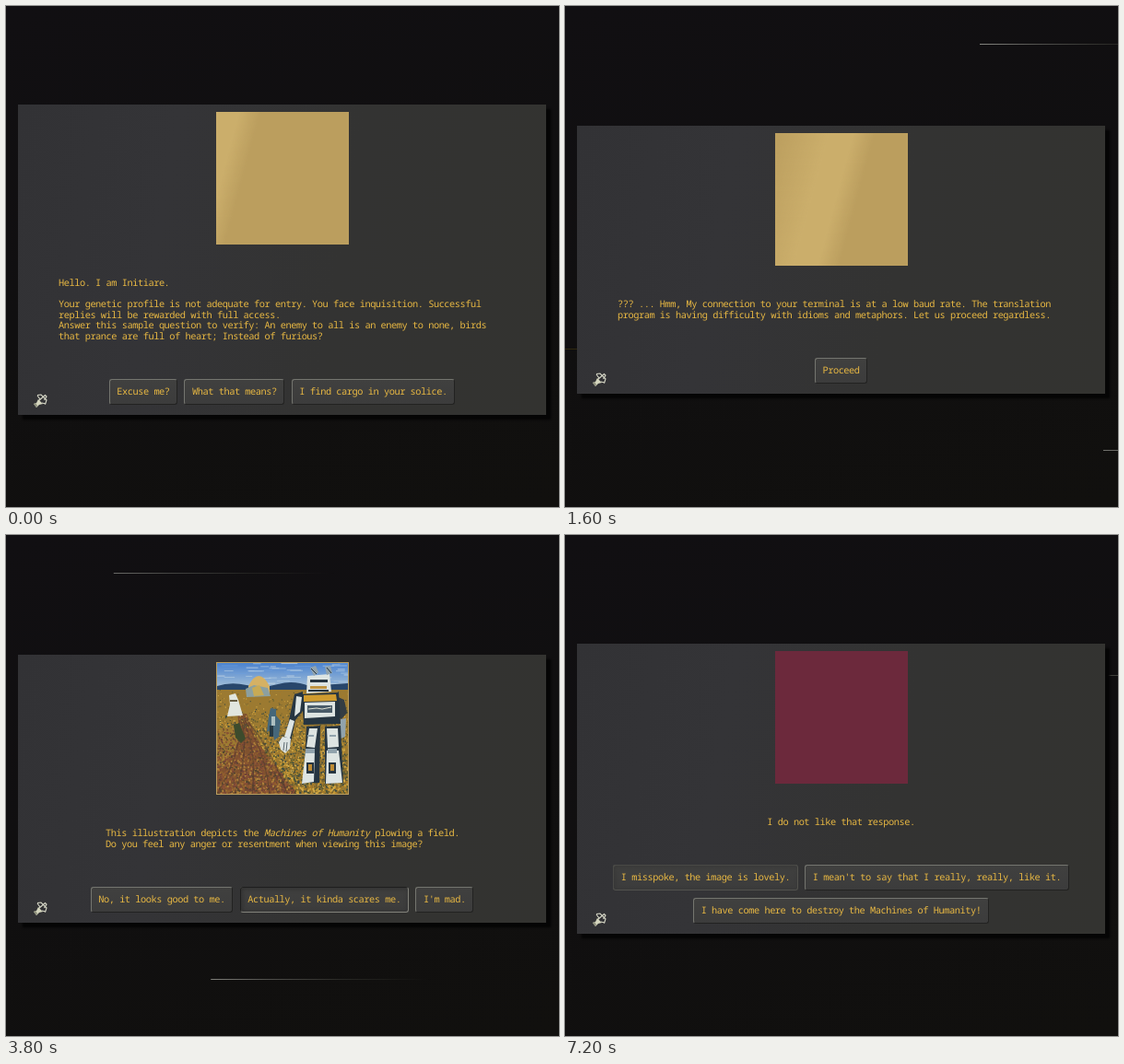
An HTML page with a canvas that plays this animation: 600x544 px, repeating every 8 s.

```html
<!DOCTYPE html>
<html lang="en">
<head>
<meta charset="utf-8">
<title>Terminal dialogue</title>
<style>
:root { --loop: 8s linear infinite; --cut: 8s step-end infinite; }
* { box-sizing: border-box; }
html, body { margin: 0; width: 100%; height: 100%; overflow: hidden; }
body {
  position: relative;
  background: linear-gradient(165deg, #110f12, #100f10 50%, #11100e);
  color: #e8b843;
  font: 10.3px/11.47px "Noto Sans Mono", "DejaVu Sans Mono", monospace;
  letter-spacing: -.447px;
  text-rendering: geometricPrecision;
  white-space: pre;
}

/* Background streaks */
.streak { position: absolute; left: 0; height: 1px; }
.comet { width: 240px; background: linear-gradient(90deg, #9c9c96, #62625e 25%, #2f2f2b 60%, transparent); }
.top { top: 41px; animation: top var(--loop); }
.low { top: 482px; animation: low var(--loop); }
.edge { width: 14px; background: #30290f; }
.right { left: 589px; width: 11px; background: #41413c; }
.e1 { top: 262px; animation: e1 var(--loop); }
.e2 { top: 372px; animation: e2 var(--loop); }
.e3 { top: 262px; animation: e3 var(--loop); }
.e4 { top: 372px; animation: e4 var(--loop); }
.e5 { top: 152px; animation: e5 var(--loop); }
@keyframes top {
  0%, 4.5% { transform: translateX(600px); opacity: .6; }
  10% { transform: translateX(499px); opacity: .7; }
  20% { transform: translateX(450px); opacity: .85; }
  40% { transform: translateX(190px); opacity: .85; }
  43.75% { transform: translateX(145px); }
  53.75% { transform: translateX(70px); opacity: .5; }
  58.75% { transform: translateX(0); opacity: .25; }
  64%, 100% { transform: translateX(0); opacity: 0; }
}
@keyframes low {
  0%, 18% { transform: translateX(600px); opacity: .7; }
  20% { transform: translateX(584px); }
  40% { transform: translateX(324px); opacity: .85; }
  58.75% { transform: translateX(70px); opacity: .75; }
  63.75% { transform: translateX(44px); }
  71.25% { transform: translateX(8px); opacity: .55; }
  76% { transform: translateX(0); opacity: .35; }
  84%, 100% { transform: translateX(0); opacity: 0; }
}
@keyframes e1 { 0% { opacity: 0; } 4%, 11% { opacity: 1; } 16%, 100% { opacity: 0; } }
@keyframes e2 { 0% { opacity: 0; } 4%, 20% { opacity: 1; } 28%, 100% { opacity: 0; } }
@keyframes e3 { 0%, 55% { opacity: 0; } 57%, 61% { opacity: 1; } 68%, 100% { opacity: 0; } }
@keyframes e4 { 0%, 55% { opacity: 0; } 57%, 70% { opacity: .9; } 78%, 100% { opacity: 0; } }
@keyframes e5 { 0%, 86% { opacity: 0; } 89%, 100% { opacity: 1; } }

/* Panels */
.panel {
  position: absolute; left: 13px; width: 573px; visibility: hidden;
  background: linear-gradient(100deg, #323235, #343437 28%, #333332 60%, #333330);
  box-shadow: 5px 5px 2px #050505;
}
.a { top: 107px; height: 337px; animation: a var(--cut); }
.b { top: 130px; height: 291px; animation: b var(--cut); }
.c { top: 130px; height: 291px; animation: c var(--cut); }
.d { top: 118px; height: 315px; animation: d var(--cut); }
@keyframes a { 0% { visibility: visible; } 12.5%, 100% { visibility: hidden; } }
@keyframes b { 0% { visibility: hidden; } 12.5% { visibility: visible; } 27.5%, 100% { visibility: hidden; } }
@keyframes c { 0% { visibility: hidden; } 27.5% { visibility: visible; } 60%, 100% { visibility: hidden; } }
@keyframes d { 0% { visibility: hidden; } 60%, 100% { visibility: visible; } }

.tile {
  position: absolute; left: 215px; top: 8px; width: 144px; height: 144px;
  overflow: hidden; background: #bb9e5e; --shine: #cbae6b;
}
.d .tile { background: #6c293c; --shine: #763648; }
.shine {
  position: absolute; left: 0; top: 0; width: 110px; height: 144px;
  background: linear-gradient(90deg, transparent, var(--shine) 55%, var(--shine) 78%, transparent);
}
.a .shine { animation: shineA var(--loop); }
.b .shine { animation: shineB var(--loop); }
.d .shine { animation: shineD var(--loop); }
@keyframes shineA {
  0% { transform: translateX(-81px) skewX(-15deg); }
  12.5%, 100% { transform: translateX(-9px) skewX(-15deg); }
}
@keyframes shineB {
  0%, 12.5% { transform: translateX(-77px) skewX(-15deg); }
  27.5%, 100% { transform: translateX(35px) skewX(-15deg); }
}
@keyframes shineD {
  0%, 60% { transform: translateX(-77px) skewX(-15deg); }
  71.25% { transform: translateX(7px) skewX(-15deg); }
  90%, 100% { transform: translateX(180px) skewX(-15deg); }
}
canvas { position: absolute; left: 1px; top: 1px; animation: reveal var(--loop); }
@keyframes reveal { 0%, 27.5% { opacity: 0; } 32.5%, 100% { opacity: 1; } }

.say { position: absolute; top: 189.3px; left: 44px; }
.c .say { left: 95px; }
.d .say { left: 0; width: 100%; text-align: center; }
.row {
  position: absolute; left: 0; bottom: 11.5px; width: 100%;
  display: flex; justify-content: center; gap: 7.3px;
}
.row.upper { bottom: 47px; }
.btn {
  position: relative; height: 28px; padding: 0 7.6px; line-height: 26px;
  border: 1px solid; border-color: #74756f #222221 #222221 #74756f; border-radius: 3px;
  background: linear-gradient(#40403f, #3c3c3c);
}
.btn::after {
  content: ""; position: absolute; inset: -1px; opacity: 0; border-radius: 3px;
  border: 1px solid; border-color: #1e1e1e #82827b #82827b #1e1e1e;
  box-shadow: inset 1px 1px 5px #2228;
}
.p1::after { animation: p1 var(--loop); }
.p2::after { animation: p2 var(--loop); }
.p3::after { animation: p3 var(--loop); }
.p4::after { animation: p4 var(--loop); }
@keyframes p1 { 0%, 8% { opacity: 0; } 9.5%, 100% { opacity: 1; } }
@keyframes p2 { 0%, 24% { opacity: 0; } 25.5%, 100% { opacity: 1; } }
@keyframes p3 { 0%, 39% { opacity: 0; } 42%, 100% { opacity: 1; } }
@keyframes p4 { 0%, 89% { opacity: 0; } 90%, 100% { opacity: .5; } }
.sound { position: absolute; left: 16px; bottom: 7px; width: 17px; height: 17px; }
</style>
</head>
<body><div class="streak comet top"></div><div class="streak comet low"></div><div class="streak edge e1"></div><div class="streak edge e2"></div><div class="streak right e3"></div><div class="streak right e4"></div><div class="streak right e5"></div><svg width="0" height="0" style="position:absolute"><symbol id="sound" viewBox="0 0 17 17"><g fill="none" stroke="#d9dac9" stroke-width="1.1"><path d="M5 2.5 9 2l6 6-1.5 4.5"/><path d="M6 9 13.5 2.5 15 4l-2.5 4"/><path d="m5 3 3 4m2 4 4 1"/></g><path d="m1 12 3-1 2-4 5 5-4 1-3 3z" fill="#d4d5bd"/><path d="m1 12 3 4 1-2-2-3z" fill="#8d8f7c"/></symbol></svg><section class="panel a"><div class="tile"><div class="shine"></div></div><div class="say">Hello. I am Initiare.

Your genetic profile is not adequate for entry. You face inquisition. Successful
replies will be rewarded with full access.
Answer this sample question to verify: An enemy to all is an enemy to none, birds
that prance are full of heart; Instead of furious?</div><div class="row"><span class="btn">Excuse me?</span><span class="btn">What that means?</span><span class="btn p1">I find cargo in your solice.</span></div><svg class="sound"><use href="#sound"/></svg></section><section class="panel b"><div class="tile"><div class="shine"></div></div><div class="say">??? ... Hmm, My connection to your terminal is at a low baud rate. The translation
program is having difficulty with idioms and metaphors. Let us proceed regardless.</div><div class="row"><span class="btn p2">Proceed</span></div><svg class="sound"><use href="#sound"/></svg></section><section class="panel c"><div class="tile"><canvas id="field" width="142" height="142"></canvas></div><div class="say">This illustration depicts the <i>Machines of Humanity</i> plowing a field.
Do you feel any anger or resentment when viewing this image?</div><div class="row"><span class="btn">No, it looks good to me.</span><span class="btn p3">Actually, it kinda scares me.</span><span class="btn">I'm mad.</span></div><svg class="sound"><use href="#sound"/></svg></section><section class="panel d"><div class="tile"><div class="shine"></div></div><div class="say">I do not like that response.</div><div class="row upper"><span class="btn p4">I misspoke, the image is lovely.</span><span class="btn">I mean't to say that I really, really, like it.</span></div><div class="row"><span class="btn">I have come here to destroy the Machines of Humanity!</span></div><svg class="sound"><use href="#sound"/></svg></section>
<script>
const g = document.getElementById('field').getContext('2d');
let seed = 7;
const rnd = () => (seed = (seed * 16807) % 2147483647) / 2147483647;
const pick = list => list[Math.floor(rnd() * list.length)];

function rect(color, x, y, w, h) {
  g.fillStyle = color;
  g.fillRect(x, y, w, h);
}
function shape(color, path) {
  g.fillStyle = color;
  g.fill(new Path2D(path));
}
function stroke(color, width, path) {
  g.strokeStyle = color;
  g.lineWidth = width;
  g.stroke(new Path2D(path));
}

function sky() {
  const fade = g.createLinearGradient(0, 0, 0, 28);
  fade.addColorStop(0, '#4a82cf');
  fade.addColorStop(1, '#a9c3d8');
  rect(fade, 0, 0, 142, 30);
  for (let i = 0; i < 45; i++) {
    rect(pick(['#dbe5ea99', '#6d9fdd99', '#b9d0e399']), rnd() * 142, rnd() * 22, 5 + rnd() * 14, 1);
  }
  shape('#28466b', 'M0 25Q15 20 32 24T66 23T100 25L142 22V32H0Z');
}

function field() {
  rect('#9c7a31', 0, 29, 142, 113);
  shape('#80522f', 'M22 55Q30 95 0 118V142H88Q50 105 32 55Z');
  for (let i = 0; i < 4200; i++) {
    const y = 29 + 113 * Math.sqrt(rnd());
    const x = rnd() * 142;
    const soil = x < y * .75 - 20 && y > 70;
    const size = .7 + y / 110;
    rect(pick(soil
      ? ['#91602f', '#704238', '#b1843c', '#544530', '#8b5136']
      : ['#c99d37', '#a87b29', '#4f552f', '#d6ad4a', '#7c6530', '#3c4a43']), x, y, size, size);
  }
  for (let i = 0; i < 5; i++) {
    stroke('#553c3099', 1.3, `M${24 + i * 2} 62Q${28 + i * 8} 95 ${i * 19} 142`);
  }
  shape('#3c4b2c', 'M18 67 24 65 31 82 26 87 20 81Z');
}

function helpers() {
  shape('#d5b164', 'M34 25Q45 3 57 25V36H34Z');
  shape('#8ca0a0', 'M31 28 40 24 55 27 58 36 32 37Z');
  shape('#c8aa54', 'M38 27 46 24 51 35 40 36Z');
  shape('#e1e6df', 'M13 35 20 33 23 40 28 57 11 58 14 45Z');
  rect('#665d43', 14, 40, 8, 2);
  shape('#45677a', 'M58 49 64 50 64 57 69 63 67 80 62 84 60 72 54 75 56 58Z');
  rect('#adbfc0', 59, 58, 4, 10);
  rect('#263943', 57, 68, 4, 12);
}

function robot() {
  const pale = '#dde4e2', mid = '#91a3ad', dark = '#263541';
  shape(dark, 'M84 34 93 31 93 52 85 62 78 95 72 92 78 62Z');
  shape(pale, 'M86 36 92 37 90 53 84 58ZM79 61 84 63 79 82 73 80ZM71 80 80 82 79 93 74 98 69 94 67 86Z');
  stroke(dark, .7, 'M73 86 72 95M76 86 75 96');
  shape('#343d43', 'M129 36 138 40 141 54 135 61 129 57Z');
  shape(mid, 'M134 61 140 60 139 80 132 83Z');
  shape(dark, 'M92 34 132 32 134 66 94 67Z');
  shape('#cf9b2e', 'M94 35 129 34 130 41 94 42Z');
  shape(pale, 'M95 43 128 42 128 58 95 60Z');
  rect('#495b68', 98, 46, 27, 8);
  stroke('#e0e3d6', 1, 'M99 50 108 49 114 50 124 48');
  rect(dark, 94, 60, 36, 3);
  shape(pale, 'M98 14 122 12 124 31 97 33Z');
  rect(dark, 101, 18, 19, 3);
  rect('#bf9443', 101, 25, 18, 3);
  rect(dark, 99, 29, 22, 2);
  shape(mid, 'M101 5 107 3 110 10 105 14ZM117 4 123 3 125 11 119 13Z');
  stroke(dark, 1, 'M102 6 108 12M119 5 124 11');
  shape(dark, 'M97 69 112 68 111 130 94 130ZM117 69 134 68 137 130 117 131Z');
  shape(pale, 'M100 71 109 71 106 92 97 91ZM119 71 131 71 132 91 120 92ZM96 95 106 96 105 129 92 131ZM119 95 132 95 136 130 118 131Z');
  for (const x of [96, 120]) {
    rect(mid, x, 93, 10, 5);
    rect(dark, x + 1, 108, 8, 12);
    rect('#bd8a33', x + 3, 110, 4, 7);
    rect(mid, x + 2, 78, 7, 2);
  }
}

rect('#c4a050', 0, 0, 142, 142);
sky();
field();
helpers();
robot();
</script>
</body>
</html>
```
